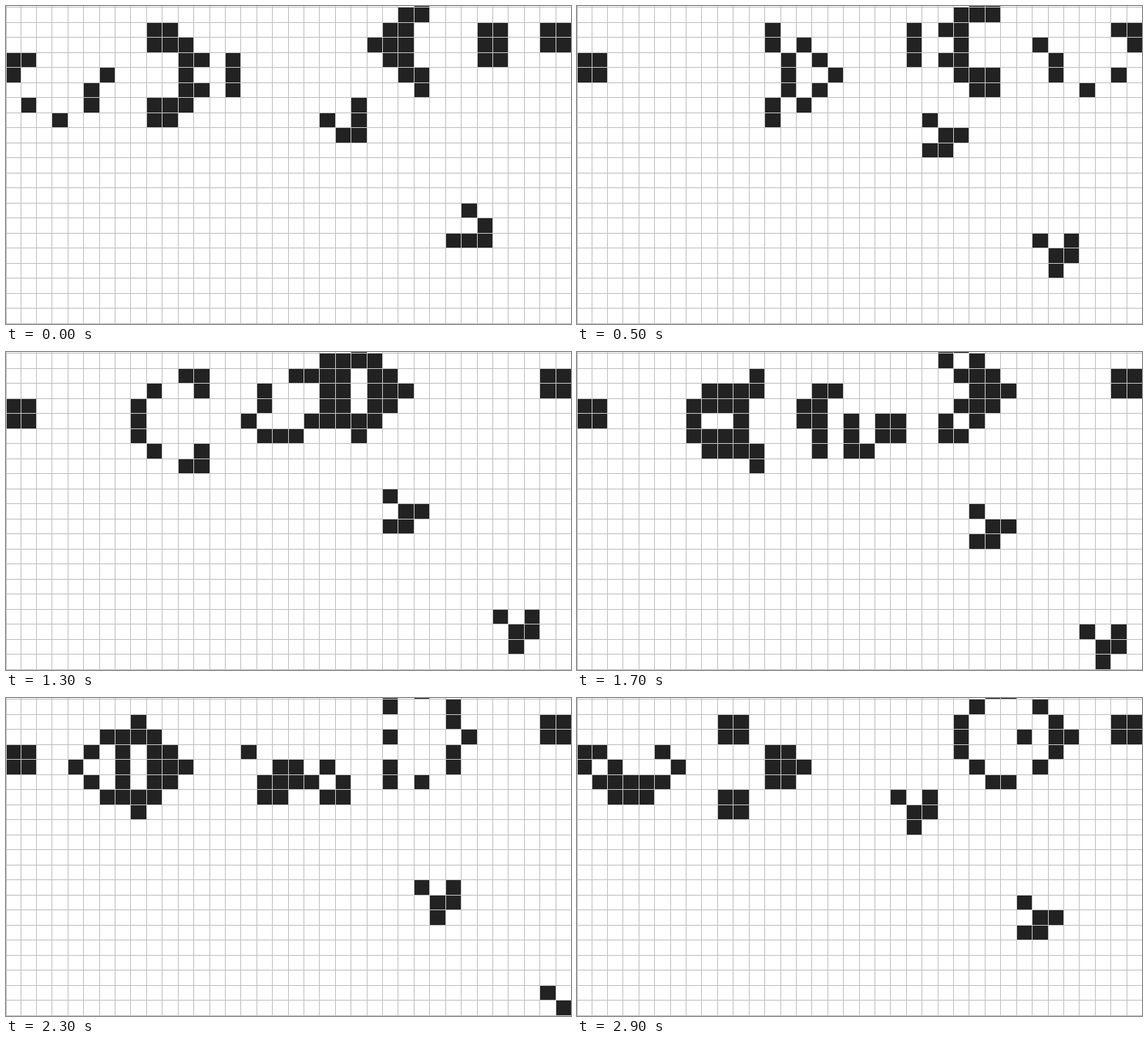
An HTML page with a canvas that plays this animation: 733x412 px, repeating every 3 s.

```html
<!DOCTYPE html>
<html lang="en">
<head>
<meta charset="utf-8">
<title>Glider gun</title>
<style>
  html, body { margin: 0; width: 100%; height: 100%; overflow: hidden; background: #fff; }
  canvas { display: block; }
</style>
</head>
<body>
<canvas id="stage" width="733" height="412"></canvas>
<script>
const W = 733, H = 412;
const COLS = 50, ROWS = 40, TOP = 4;   // board is larger than the view; TOP rows lie above it
const PERIOD = 30, STEP = 100, SEED_GEN = 25;
const ctx = document.getElementById('stage').getContext('2d');

const lineX = c => c ? Math.floor(20.41 * c - 1.3) : 0;
const lineY = r => Math.floor(19.5 * r + 1.5);

const glider = 'O.O/.OO/.O.';
const seed = [
  [0, 3, 'OO/OO'],
  [4, 3, 'OO/OO/OO'],
  [9, 1, 'O/OO/.OO/.OOO/.OO/OO/O'],
  [26, -1, 'O/O.O/.O.O/.O..O/.O.O/O.O/O'],
  [34, 1, 'OO/OO'],
  [19, 5, glider],
  [27, 12, 'O../.OO/OO.'],
  [34, 20, glider]
];

function plant() {
  const board = new Uint8Array(COLS * ROWS);
  for (const [x, y, shape] of seed) {
    shape.split('/').forEach((row, j) => {
      [...row].forEach((ch, i) => {
        if (ch === 'O') board[(y + j + TOP) * COLS + x + i] = 1;
      });
    });
  }
  return board;
}

function evolve(board) {
  const next = new Uint8Array(board.length);
  const at = (x, y) => x >= 0 && x < COLS && y >= 0 && y < ROWS ? board[y * COLS + x] : 0;
  for (let y = 0; y < ROWS; y++) {
    for (let x = 0; x < COLS; x++) {
      let n = -at(x, y);
      for (let j = -1; j < 2; j++) {
        for (let i = -1; i < 2; i++) n += at(x + i, y + j);
      }
      next[y * COLS + x] = n === 3 || (n === 2 && at(x, y)) ? 1 : 0;
    }
  }
  return next;
}

// The gun repeats every 30 generations, so one cycle is enough.
const cycle = [];
for (let i = 0, board = plant(); i < PERIOD; i++, board = evolve(board)) {
  cycle[(SEED_GEN + i) % PERIOD] = board;
}

function draw(board) {
  ctx.fillStyle = '#fff';
  ctx.fillRect(0, 0, W, H);
  ctx.fillStyle = '#222';
  for (let r = -1; r < 22; r++) {
    for (let c = 0; c < 36; c++) {
      if (!board[(r + TOP) * COLS + c]) continue;
      const x = lineX(c), y = lineY(r);
      ctx.fillRect(x, y, lineX(c + 1) - x, lineY(r + 1) - y);
    }
  }
  ctx.fillStyle = '#c0c0c0';
  for (let c = 0; c < 36; c++) ctx.fillRect(lineX(c), 0, 1, H);
  for (let r = 0; r < 22; r++) ctx.fillRect(0, lineY(r), W, 1);
}

const start = performance.now();
let shown = -1;
function tick() {
  const gen = Math.floor((performance.now() - start) / STEP) % PERIOD;
  if (gen !== shown) draw(cycle[shown = gen]);
  requestAnimationFrame(tick);
}
tick();
</script>
</body>
</html>
```
